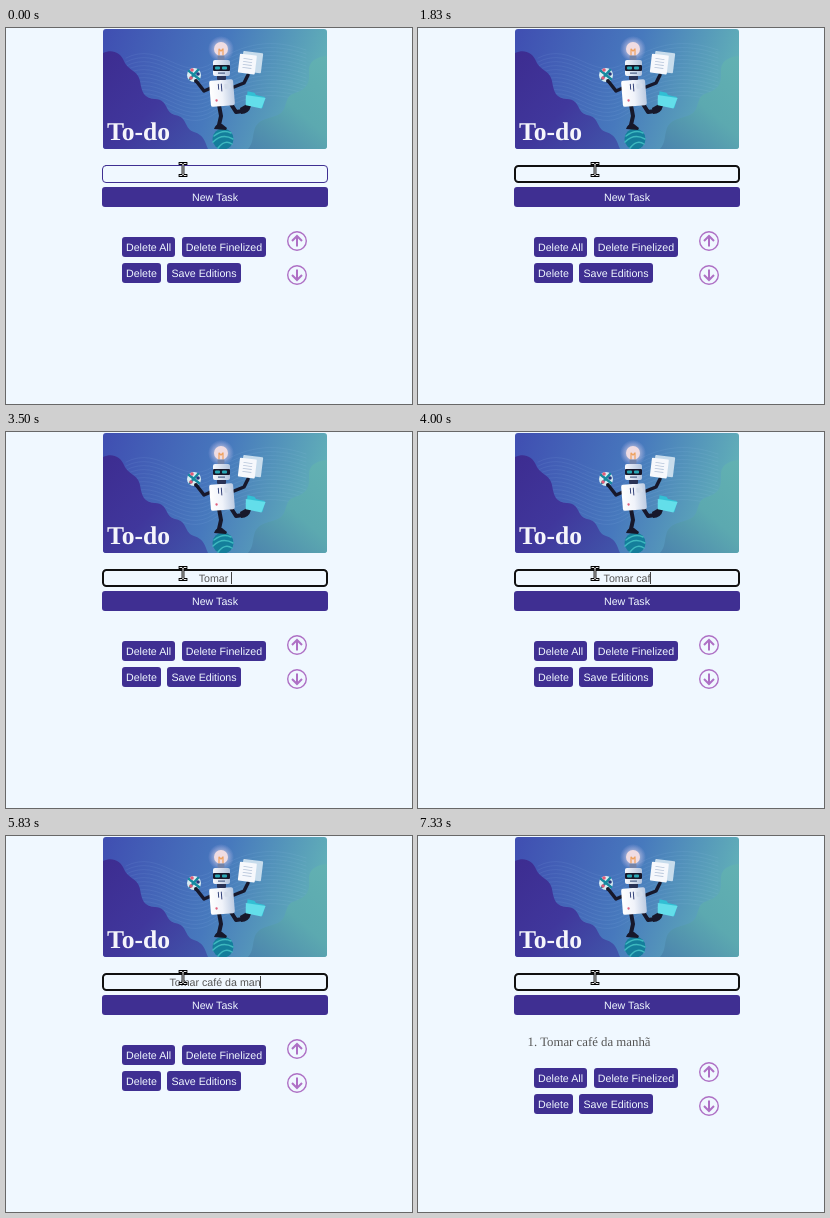
Animation, 406 px wide and 376 px high, one loop 8000 ms. Source, as an HTML page with a canvas:

```html
<!DOCTYPE html>
<html lang="en">
<head>
<meta charset="utf-8">
<title>To-do</title>
<style>
html, body { margin: 0; width: 100%; height: 100%; overflow: hidden; background: #f0f8ff; }
canvas { display: block; }
</style>
</head>
<body>
<canvas id="stage" width="406" height="376"></canvas>
<script>
const ctx = document.getElementById('stage').getContext('2d');
const LOOP = 8000;
const SANS = '10.667px "Liberation Sans", Arial, sans-serif';
const SERIF = '"Liberation Serif", "Times New Roman", serif';
const PURPLE = '#3f2f92';
const TASK = 'Tomar café da manhã';
const SUBMIT = 7170;

// [time, typed characters]
const TYPING = [[2330, 1], [2830, 2], [3000, 3], [3170, 4], [3330, 5], [3500, 6], [3830, 7],
  [4000, 9], [5330, 14], [5670, 15], [5830, 17], [6000, 18], [6830, 19], [SUBMIT, 0]];
const CARET_TOGGLES = [170, 670, 1170, 1830, 2330, 6500, 6830, 7330];

ctx.textRendering = 'geometricPrecision';

function text(str, x, y, font, color, align = 'left') {
  ctx.font = font;
  ctx.fillStyle = color;
  ctx.textAlign = align;
  ctx.fillText(str, x, y);
}

function roundRect(x, y, w, h, r) {
  ctx.beginPath();
  ctx.roundRect(x, y, w, h, r);
}

function box(x, y, w, h, r, color) {
  roundRect(x, y, w, h, r);
  ctx.fillStyle = color;
  ctx.fill();
}

function disc(x, y, r, color) {
  ctx.beginPath();
  ctx.arc(x, y, r, 0, Math.PI * 2);
  ctx.fillStyle = color;
  ctx.fill();
}

function fillPath(d, color) {
  ctx.fillStyle = color;
  ctx.fill(new Path2D(d));
}

function strokePath(d, color, width) {
  ctx.strokeStyle = color;
  ctx.lineWidth = width;
  ctx.stroke(new Path2D(d));
}

function tilted(x, y, angle, draw) {
  ctx.save();
  ctx.translate(x, y);
  ctx.rotate(angle);
  draw();
  ctx.restore();
}

function gradient(x0, y0, x1, y1, ...colors) {
  const g = ctx.createLinearGradient(x0, y0, x1, y1);
  colors.forEach((c, i) => g.addColorStop(i / (colors.length - 1), c));
  return g;
}

function drawRobot() {
  const ink = '#17182b';
  ctx.lineCap = ctx.lineJoin = 'round';

  // ball and legs
  disc(217, 111, 10.5, '#147e9b');
  strokePath('M208 108Q217 101 225 105M207 114Q216 105 227 111M212 120Q219 111 226 116', '#3db8bf', 1.5);
  strokePath('M213 77L215 88L213 97', ink, 4);
  strokePath('M225 76L230 84L237 83', ink, 4);
  fillPath('M208 101Q210 95 216 96L221 100L220 102Z', ink);
  fillPath('M234 80L241 76L245 78Q243 86 235 86Z', ink);

  // arms and what they carry
  strokePath('M205 60L198 63L191 54', ink, 3.5);
  strokePath('M228 59L238 55L242 47', ink, 3.5);
  disc(188, 47, 7, '#d9edf2');
  strokePath('M183 43L193 51M184 51L192 42', '#168aa0', 2.5);
  disc(186, 42, 1.8, '#e35b78');
  disc(192, 46, 1.8, '#26367d');
  disc(185, 50, 1.8, '#e35b78');
  disc(190, 53, 2, ink);
  tilted(245, 35, 0.12, () => {
    box(-9, -11, 20, 20, 1, '#c7dcec');
    box(-12, -8, 17, 19, 1, '#f6f8fc');
    ctx.fillStyle = '#b6c5da';
    for (let y = -4; y < 7; y += 3) ctx.fillRect(-8, y, 9, 0.8);
  });
  tilted(249, 72, 0.2, () => {
    fillPath('M-9-7H-2L0-5H9V6H-8Z', '#32bfd4');
    fillPath('M-10-3L10-4L8 7H-8Z', '#63deea');
  });

  // torso
  tilted(216, 65, -0.08, () => {
    box(-12, -13, 24, 26, 2, gradient(-12, 0, 12, 0, '#ffffff', '#f0f3fa', '#bccbe2'));
    box(3, -9, 6, 5, 1, '#d3dcea');
    strokePath('M-3-9V-4M0-9V-2', '#334279', 1);
    disc(-6, 7, 1.2, '#e0607d');
  });

  // head
  box(211, 47, 9, 5, 1, '#293255');
  box(207, 32, 17, 16, 2, gradient(207, 0, 224, 0, '#f6f8fd', '#b3c4dd'));
  box(207, 37, 17, 6, 1, ink);
  box(209, 38.5, 5, 3, 1, '#2aa8b5');
  box(216, 38.5, 5, 3, 1, '#2aa8b5');
  box(212, 44.5, 7, 1.2, 0, '#53668c');

  // bulb
  const glow = ctx.createRadialGradient(215, 21, 1, 215, 21, 13);
  glow.addColorStop(0, 'rgba(255,240,220,.9)');
  glow.addColorStop(1, 'rgba(225,205,255,0)');
  disc(215, 21, 13, glow);
  disc(215, 21, 7, '#f0dce2');
  strokePath('M213 27V21L215 23L217 21V27', '#eea15f', 1.2);
  box(211.5, 27.5, 7, 4.5, 1, '#7383a9');
}

function drawBanner() {
  ctx.save();
  roundRect(97, 1, 224, 120, 3);
  ctx.clip();
  ctx.fillStyle = gradient(97, 20, 321, 90, '#4050b2', '#4779bd', '#65b8b7');
  ctx.fillRect(97, 1, 224, 120);

  ctx.globalAlpha = 0.12;
  for (let i = 0; i < 14; i++) {
    const y = 30 + i * 4;
    strokePath(`M120 ${y}C155 ${y - 18} 175 ${y + 25} 207 ${y + 5}S265 ${y - 20} 300 ${y - 8}`, '#b7ddf5', 0.7);
  }
  ctx.globalAlpha = 1;

  fillPath('M97 25C106 21 114 24 118 33C122 43 132 42 134 53C136 65 138 70 149 71C163 72 158 84 169 87C182 89 178 101 188 104C198 107 199 114 202 121H97Z',
    gradient(97, 30, 200, 121, '#3d2d91', '#40379c', '#4156aa'));
  fillPath('M321 28C309 29 302 34 303 45C304 58 298 62 289 65C278 68 282 79 275 85C267 91 254 89 249 100C246 108 248 114 242 121H321Z',
    gradient(242, 121, 321, 28, '#4b83ad', '#5ca9b0', '#62b1b2'));
  drawRobot();
  ctx.restore();
  text('To-do', 101, 112, `bold 25.6px ${SERIF}`, '#f5f5fb');
}

function drawButton(label, x, y, w) {
  box(x, y, w, 20, 3, PURPLE);
  text(label, x + w / 2, y + 14, SANS, '#f0f8ff', 'center');
}

function drawArrow(x, y, dir) {
  const color = '#ae70c5';
  ctx.lineCap = 'butt';
  ctx.lineJoin = 'miter';
  ctx.beginPath();
  ctx.arc(x, y, 9.3, 0, Math.PI * 2);
  ctx.strokeStyle = color;
  ctx.lineWidth = 1.4;
  ctx.stroke();
  strokePath(`M${x} ${y + 5.5 * dir}V${y - 4.5 * dir}M${x - 5} ${y}L${x} ${y - 5 * dir}L${x + 5} ${y}`, color, 2);
}

function drawInput(focused, typed, caret) {
  const width = focused ? 2 : 1;
  roundRect(96 + width / 2, 137 + width / 2, 226 - width, 18 - width, 3.5);
  ctx.strokeStyle = focused ? '#101010' : PURPLE;
  ctx.lineWidth = width;
  ctx.stroke();

  ctx.font = SANS;
  const half = ctx.measureText(typed).width / 2;
  text(typed, 209 - half, 150, SANS, '#555');
  if (caret) {
    ctx.fillStyle = '#444';
    ctx.fillRect(Math.floor(209 + half), 140, 1, 12);
  }
}

function drawPointer() {
  const beam = 'M174 135.5H176L177 136.5L178 135.5H180M177 136.5V146.5M174 147.5H176L177 146.5L178 147.5H180';
  ctx.lineCap = 'square';
  ctx.lineJoin = 'miter';
  strokePath(beam, '#000', 2.8);
  strokePath(beam, '#fff', 0.9);
}

function render(t) {
  ctx.fillStyle = '#f0f8ff';
  ctx.fillRect(0, 0, 406, 376);
  drawBanner();

  const count = TYPING.reduce((n, [at, chars]) => t >= at ? chars : n, 0);
  const caret = CARET_TOGGLES.filter(at => t >= at).length % 2 === 1;
  drawInput(t >= 170, TASK.slice(0, count), caret);
  drawButton('New Task', 96, 159, 226);

  const added = t >= SUBMIT;
  const shift = added ? 23 : 0;
  if (added) text('1. ' + TASK, 109.6, 210, `12.8px ${SERIF}`, '#555');
  drawButton('Delete All', 116, 209 + shift, 53);
  drawButton('Delete Finelized', 176, 209 + shift, 84);
  drawButton('Delete', 116, 235 + shift, 39);
  drawButton('Save Editions', 161, 235 + shift, 74);
  drawArrow(291, 213 + shift, 1);
  drawArrow(291, 247 + shift, -1);
  drawPointer();
}

const start = performance.now();
function tick() {
  render((performance.now() - start) % LOOP);
  requestAnimationFrame(tick);
}
tick();
</script>
</body>
</html>
```
